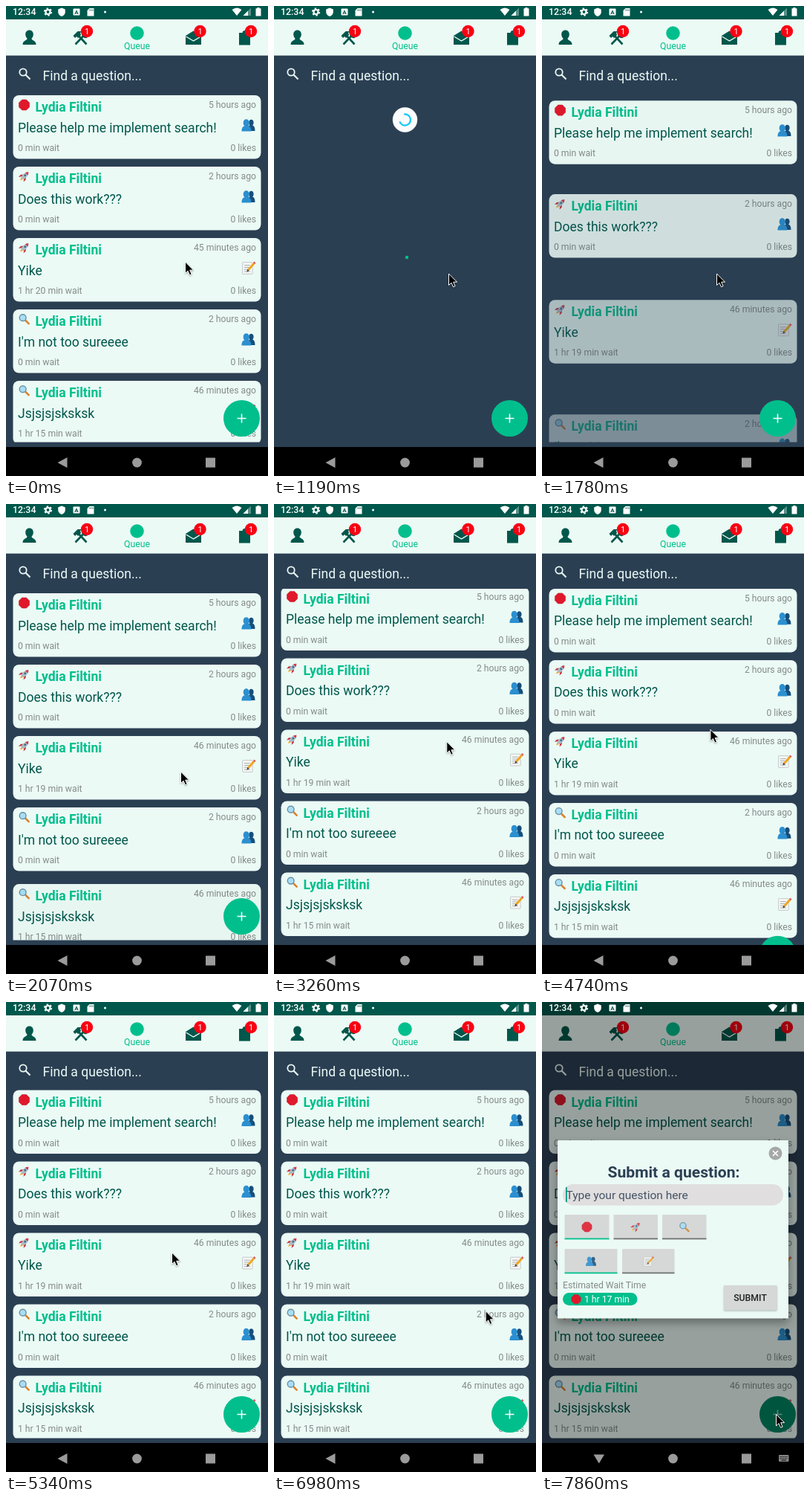
An HTML page that plays this animation: 353x632 px, repeating every 8 s.

```html
<!DOCTYPE html>
<html lang="en">
<head>
<meta charset="utf-8">
<title>Question queue</title>
<style>
  html, body { margin: 0; height: 100%; overflow: hidden; background: #2b3f53; }
  svg { display: block; width: 100%; height: 100%; font-family: Roboto, sans-serif; }
</style>
</head>
<body>
<svg id="stage" viewBox="0 0 353 632"></svg>
<script>
const GREEN = '#00bf8c', DARK = '#00574b', PALE = '#ebfaf5', NAVY = '#2b3f53', GREY = '#848b89';
const STEP = 8000 / 54;

const rect = (x, y, w, h, fill, rx = 0, more = '') =>
  `<rect x="${x}" y="${y}" width="${w}" height="${h}" rx="${rx}" fill="${fill}" ${more}/>`;
const disc = (x, y, r, fill) => `<circle cx="${x}" cy="${y}" r="${r}" fill="${fill}"/>`;
const path = (d, fill, more = '') => `<path d="${d}" fill="${fill}" ${more}/>`;
const line = (d, color, width, more = '') => path(d, 'none', `stroke="${color}" stroke-width="${width}" ${more}`);
const text = (x, y, size, fill, s, more = '') =>
  `<text x="${x}" y="${y}" font-size="${size}" fill="${fill}" ${more}>${s}</text>`;
const BOLD = 'font-weight="700"', END = 'text-anchor="end"', MID = 'text-anchor="middle"';

// Small pictures, each centred in a 16 unit box
const octagon = 'M-3.1-7.5h6.2L7.5-3.1v6.2L3.1 7.5h-6.2L-7.5 3.1v-6.2z';
const pictures = {
  stop: path(octagon, '#e0182b', 'stroke="#c2142a" stroke-width=".6"'),
  rocket: `<g transform="rotate(45) scale(.92)">
    ${path('M-2.5 3L-5.5 7V2L-2.8-1zM2.5 3L5.5 7V2L2.8-1z', '#c9303c')}
    ${path('M-2 4.5L0 9 2 4.5z', '#f6a623')}
    ${path('M0-9.5C4-5 3.6 0 2.4 4.5h-4.8C-3.6 0-4-5 0-9.5z', '#a9bac4')}
    ${path('M0-9.5Q2.3-7.5 2.7-5h-5.4Q-2.3-7.5 0-9.5z', '#d33c47')}
    ${disc(0, -2, 1.6, '#2f6d94')}</g>`,
  lens: line('M2 2L6.5 6.500', '#d9822b', 2.8, 'stroke-linecap="round"') +
    `<circle cx="-2" cy="-2" r="4.700" fill="#a8def5" stroke="#6a8fa3" stroke-width="1.500"/>`,
  people: path('M-1 7C-1 1.500 1 .5 2 .5 0-1 0-6.500 3.500-6.500S7-1 5 .5C7 1 8 3 8 7z', '#174f7c') +
    path('M-8 7.500C-8 2.500-6 1.500-4.500 1-7-1-6.500-7-2.500-7S2-1 0 1C1.500 1.500 3.500 2.500 3.500 7.500z', '#2b8fd0'),
  memo: rect(-7, -6.5, 12, 14, '#f7f7f4', .6, 'stroke="#b7bfc2" stroke-width=".7"') +
    line('M-5-3h7M-5-.5h6M-5 2h5M-5 4.5h7', '#9aa7ad', .8) +
    line('M7-5.5L0 2.5', '#f0a51e', 2.6) + line('M8-6.6L6.8-5.3', '#dd5566', 2.6) +
    path('M-2 5l1-3.4 2.1 1.9z', '#4a4038')
};
const pic = (name, x, y, size, alpha = 1) =>
  `<g transform="translate(${x} ${y}) scale(${size / 16})" opacity="${alpha}">${pictures[name]}</g>`;

const questions = [
  ['stop', '5 hours ago', 'Please help me implement search!', '0 min wait', 'people'],
  ['rocket', '2 hours ago', 'Does this work???', '0 min wait', 'people'],
  ['rocket', '45 minutes ago', 'Yike', '1 hr 20 min wait', 'memo'],
  ['lens', '2 hours ago', "I'm not too sureeee", '0 min wait', 'people'],
  ['lens', '46 minutes ago', 'Jsjsjsjsksksk', '1 hr 15 min wait', 'memo']
];
const card = ([kind, ago, title, wait, mode], i) => `<g class="card">
  ${rect(9.5, 0, 334, 85.5, PALE, 8)}
  ${pic(kind, 24.5, 13, 15)}
  ${text(39.5, 22, 17.55, GREEN, 'Lydia Filtini', BOLD)}
  ${text(337, 17, 12.2, GREY, ago, `${END} id="ago${i}"`)}
  ${text(16, 49.5, 17.55, DARK, title)}
  ${pic(mode, 326.5, 40, 18)}
  ${text(16, 75, 12.2, GREY, wait, `id="wait${i}"`)}
  ${text(337, 75, 12.2, GREY, '0 likes', END)}</g>`;

const badge = x => disc(x, 34, 8.2, '#f80014') + text(x, 38, 11, '#fff', '1', MID);
const header = rect(0, 0, 353, 18, DARK) + rect(0, 18, 353, 48.6, PALE) +
  path('M31.5 32.5c3.5 0 5.3 2.6 5.3 5.8 0 2.6-1.3 4.4-2.3 5.5 0 3 6 2 6 8.2h-18c0-6.2 6-5.2 6-8.2-1-1.1-2.3-2.9-2.3-5.5 0-3.2 1.8-5.8 5.3-5.8z', DARK) +
  line('M93.5 51.5L106 38.5M96 38l12.5 13.5', DARK, 2.6) +
  path('M90.5 40l6-6h6l-2.5 2 1 3-4 4-2-2-2 2z', DARK) +
  line('M103.5 36.5a4 4 0 0 0 5.5 5', DARK, 2.4) +
  disc(176.5, 36.5, 9.3, GREEN) + text(176.5, 58, 12.3, GREEN, 'Queue', MID) +
  path('M242 40l10.5-6.5L263 40v12h-21z', DARK) + line('M242.5 41l10 6 10-6', PALE, 1.4) +
  path('M314 36h4.5q.5-3 3-3t3 3h4.5v16.5h-15z', DARK) +
  [109, 261.5, 330].map(badge).join('') +
  `<circle cx="23" cy="89" r="4.7" fill="none" stroke="${PALE}" stroke-width="1.8"/>` +
  line('M26.5 92.5l6 6', PALE, 2.1) +
  text(49.5, 99.5, 17.55, PALE, 'Find a question...');

const shield = 'M75 2.5l4.8 2v3.5q0 4-4.8 6-4.8-2-4.8-6v-3.5z';
const status = text(9, 12.3, 12.4, '#fff', '12:34', 'font-weight="500"') +
  `<circle cx="56.5" cy="8" r="3" fill="none" stroke="#fff" stroke-width="2.2"/>` +
  `<circle cx="56.5" cy="8" r="4.8" fill="none" stroke="#fff" stroke-width="1.6" stroke-dasharray="2.5 2.527"/>` +
  path(shield, '#fff') +
  rect(90.5, 3.5, 9, 9, '#fff', 1) + text(95, 11, 8, DARK, 'A', MID + ' ' + BOLD) +
  path('M112.5 3h6v10.5h-9V6z', '#fff') + line('M113 4.5v2M115 4.5v2M117 4.5v2', DARK, .9) +
  disc(133.5, 8, 1.5, '#fff') +
  path('M304.5 5q6.5-5 13 0L311 13z', '#fff') +
  path('M330 2.5V13h-10.5z', '#fff', 'opacity=".35"') + path('M326 6.5V13h-6.5z', '#fff') +
  path('M338.5 2h3v1.2h2V13.5h-7V3.2h2z', '#fff');

const choice = (x, y, w, name, on) => rect(x, y, w, 33, '#d6d8d7', 1) +
  rect(x, y + 31.5, w, 1.8, on ? GREEN : '#707372') + pic(name, x + w / 2, y + 16.5, 14, .85);
const modal = rect(21, 186, 311, 239.5, PALE, 1, 'style="filter:drop-shadow(0 6px 6px #0005)"') +
  disc(314.5, 203.5, 9, '#a6a8a8') + line('M311 200l7 7m0-7l-7 7', '#fff', 1.7) +
  text(177.5, 236, 21.1, NAVY, 'Submit a question:', `${BOLD} ${MID}`) +
  rect(28, 245, 297, 28.5, '#e0dedf', 14.2) +
  text(32.5, 265, 15.5, '#435365', 'Type your question here') + rect(32, 249, 1.7, 20, '#009680') +
  choice(30.5, 286, 60, 'stop', true) + choice(96.5, 286, 59.5, 'rocket') + choice(162, 286, 59.5, 'lens') +
  choice(30.5, 332, 71, 'people', true) + choice(108, 332, 70.5, 'memo') +
  text(28, 385, 12.2, GREY, 'Estimated Wait Time') +
  rect(28, 391, 100.5, 17, GREEN, 8.5) + pic('stop', 46, 399.7, 13) + text(57, 404, 12.2, '#fff', '1 hr 17 min') +
  rect(245, 381, 71.5, 33.5, '#d6d8d7', 1, 'style="filter:drop-shadow(0 1px 1px #0004)"') +
  text(280.5, 402.3, 12.3, '#222', 'SUBMIT', `${MID} font-weight="500"`);

const keyboard = rect(319, 609, 13.5, 9, '#858585', 1) +
  line('M320.5 611.5h10.5M320.5 613.7h10.5', '#000', 1.1, 'stroke-dasharray="1.2 1"') +
  line('M322.5 616h6.5', '#000', 1);

const $ = id => document.getElementById(id);
$('stage').innerHTML = `
  <defs>
    <clipPath id="listArea"><rect y="114" width="353" height="472.5"/></clipPath>
    <clipPath id="appArea"><rect width="353" height="593"/></clipPath>
  </defs>
  ${rect(0, 0, 353, 632, NAVY)}${header}
  <g clip-path="url(#listArea)">
    ${questions.map(card).join('')}
    <g id="loader">${rect(-2, -2, 4, 4, GREEN)}</g>
    <g id="spinner">${disc(0, 0, 16.7, '#fcfcfc')}
      <circle id="arc" r="7.5" fill="none" stroke="#13c9f5" stroke-width="2.3" stroke-dasharray="34 14"/></g>
  </g>
  <g clip-path="url(#appArea)"><g id="fab">
    <circle id="fabDisc" cx="317.5" cy="554.5" r="24.5"/>
    ${line('M311.5 554.5h12M317.5 548.5v12', '#fff', 1.6, 'id="plus"')}</g></g>
  <g id="overlay">${rect(0, 0, 353, 593, '#000', 0, 'opacity=".36"')}${modal}</g>
  ${status}
  ${rect(0, 593, 353, 39, '#000')}
  <path id="back" fill="#9b9b9b"/>
  ${disc(176.5, 614, 6.4, '#9b9b9b')}${rect(269, 607.5, 13, 13, '#9b9b9b')}
  <g id="keyboard">${keyboard}</g>
  <g id="pointer" style="filter:drop-shadow(0 1px 1px #0005)">
    ${path('M0 0V15.5l3.5-3.3 2.5 5.6 2.6-1.1-2.4-5.5h4.9z', '#000', 'stroke="#fff" stroke-width="1"')}</g>`;
const cards = [...document.querySelectorAll('.card')];

const clamp = v => Math.max(0, Math.min(1, v));
const part = (t, a, b) => clamp((t - a) / (b - a));
const smooth = u => u * u * (3 - 2 * u);
const easeInOut = u => u < .5 ? (2 * u) ** 1.65 / 2 : 1 - (2 - 2 * u) ** 1.65 / 2;

const route = [
  [0, 241.5, 344], [450, 239, 250], [1040, 235.5, 360], [2670, 235.5, 360], [3850, 230, 279],
  [4000, 229.5, 278], [4300, 229.5, 278], [5330, 223.5, 337], [5630, 223.5, 337],
  [5926, 221.5, 207.5], [6075, 221.5, 207.5], [6222, 214.5, 137.5], [6370, 214.5, 137.5],
  [7259, 320.5, 554.5], [7407, 320.5, 554.5], [7555, 315.5, 554.5], [8000, 315.5, 554.5]
];
function pointerAt(t) {
  const i = route.findIndex(p => p[0] > t);
  const [a, b] = [route[i - 1], route[i]], u = part(t, a[0], b[0]);
  return [a[1] + (b[1] - a[1]) * u, a[2] + (b[2] - a[2]) * u];
}

const set = (id, name, value) => $(id).setAttribute(name, value);
const show = (id, on) => set(id, 'visibility', on ? 'visible' : 'hidden');
const move = (id, x, y, more = '') => set(id, 'transform', `translate(${x} ${y}) ${more}`);

function draw(t) {
  const reloaded = t > 1030;
  $('ago2').textContent = reloaded ? '46 minutes ago' : '45 minutes ago';
  $('wait2').textContent = reloaded ? '1 hr 19 min wait' : '1 hr 20 min wait';

  const scroll = 8.5 * smooth(part(t, 2750, 3250)) - 7 * smooth(part(t, 4350, 5330));
  cards.forEach((el, i) => {
    const p = reloaded ? easeInOut(part(t, 1341 + 74 * i, 1821 + 74 * i)) : 1;
    el.setAttribute('transform', `translate(0 ${120 + 96 * i - scroll + 242 * (1 - p)})`);
    el.setAttribute('opacity', Math.min(1, p * 1.01));
  });

  show('loader', t > 1180 && t < 1330);
  move('loader', 179, 338, 'rotate(8)');
  show('spinner', t > 735 && t < 1540);
  move('spinner', 176.5, 137 + 16 * part(t, 735, 1040), `scale(${1 - part(t, 1335, 1540)})`);
  set('arc', 'transform', `rotate(${-100 + (t - 1185) * .4})`);

  move('fab', 0, 66 * (smooth(part(t, 2850, 3300)) - smooth(part(t, 4600, 5050))));
  const pressed = t > 7550;
  set('fabDisc', 'fill', pressed ? '#008462' : GREEN);
  set('plus', 'opacity', pressed ? .6 : 1);

  const open = part(t, 7500, 7840);
  set('overlay', 'opacity', open);
  show('overlay', open > 0);
  show('keyboard', open === 1);
  set('back', 'd', open === 1 ? 'M69.5 608.5h14.5l-7.2 12z' : 'M69.5 614l13-7v14z');
  move('pointer', ...pointerAt(t));
}

// The screen is refreshed 54 times per loop
function tick(now) {
  draw(Math.min(53, Math.floor((now % 8000 + 5) / STEP)) * STEP);
  requestAnimationFrame(tick);
}
draw(0);
requestAnimationFrame(tick);
</script>
</body>
</html>
```
